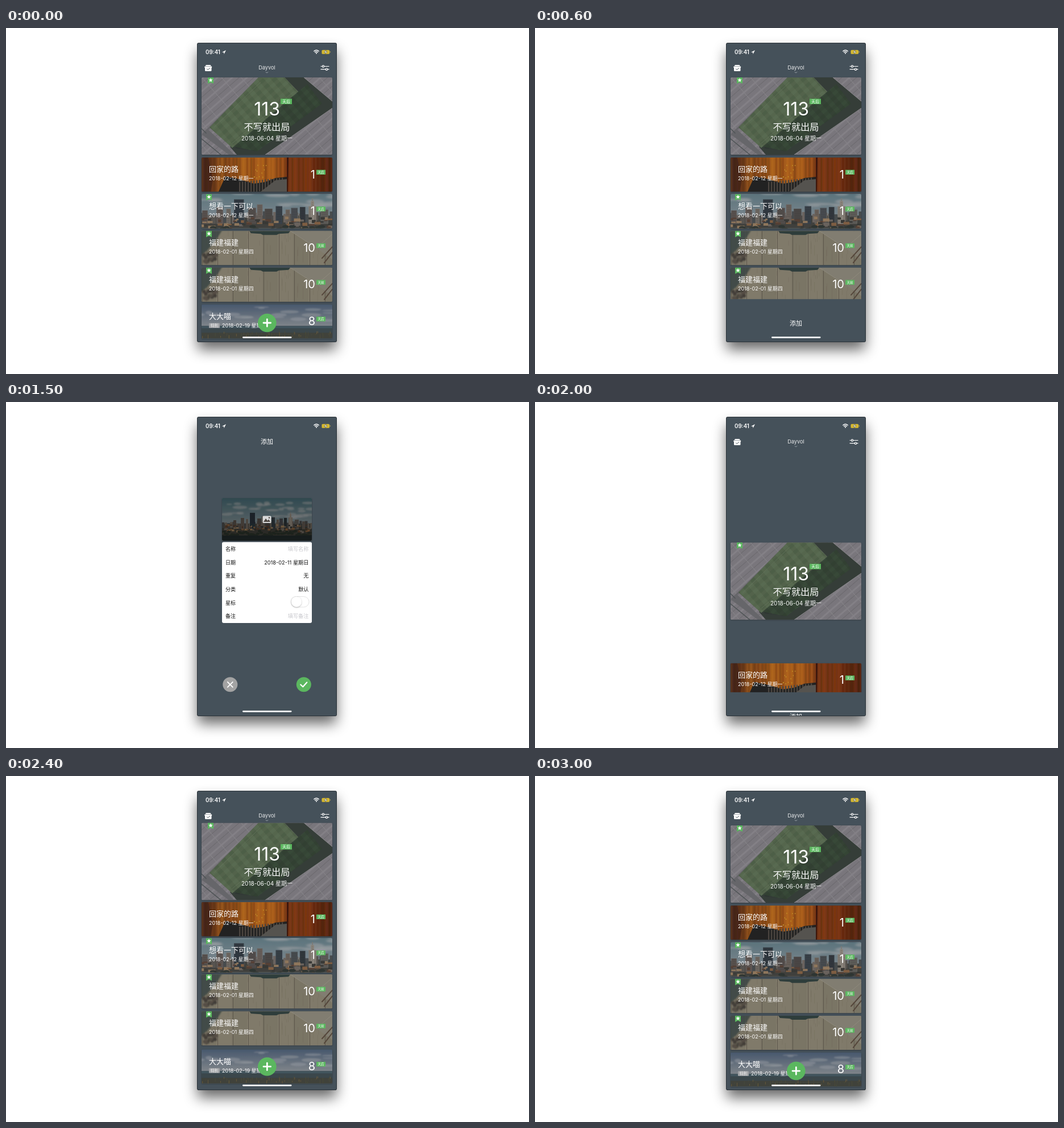
Write an HTML page that moves like this. It is 920 px wide and 609 px high and loops after 3100 ms.

```html
<!DOCTYPE html>
<html lang="zh">
<head>
<meta charset="utf-8">
<style>
  html, body { margin: 0; width: 100%; height: 100%; overflow: hidden; background: #fff; }
  svg { display: block; }
  text { font-family: Inter, "Noto Sans CJK SC", "Noto Sans CJK", sans-serif; fill: #fff; }
</style>
</head>
<body>
<svg id="stage" width="920" height="609" viewBox="0 0 920 609"></svg>
<script>
const BG = '#45515a', GREEN = '#5bb75f', HEIGHT = 525, LOOP = 3100;
const OPEN_AT = 571, CLOSE_AT = 1816;

let seed = 7;
const rnd = () => (seed = seed * 16807 % 2147483647) / 2147483647;
const many = (n, fn) => Array.from({ length: n }, (_, i) => fn(i)).join('');

const rect = (x, y, w, h, fill, extra = '') =>
  `<rect x="${x}" y="${y}" width="${w}" height="${h}" fill="${fill}" ${extra}/>`;
const poly = (points, fill, extra = '') => `<polygon points="${points}" fill="${fill}" ${extra}/>`;
const line = (d, stroke, width = 1) =>
  `<path d="${d}" fill="none" stroke="${stroke}" stroke-width="${width}" stroke-linecap="round" stroke-linejoin="round"/>`;
const disc = (x, y, r, fill) => `<circle cx="${x}" cy="${y}" r="${r}" fill="${fill}"/>`;
const oval = (x, y, rx, ry, fill, opacity) =>
  `<ellipse cx="${x}" cy="${y}" rx="${rx}" ry="${ry}" fill="${fill}" opacity="${opacity}"/>`;
const label = (x, y, size, str, extra = '') =>
  `<text x="${x}" y="${y}" font-size="${size}" ${extra}>${str}</text>`;
const soft = body => `<g filter="url(#soft)">${body}</g>`;
const END = 'text-anchor="end"', MID = 'text-anchor="middle"';

const defs = `<defs>
  <filter id="blur" x="-30%" y="-30%" width="160%" height="160%"><feGaussianBlur stdDeviation="12.5"/></filter>
  <filter id="soft"><feGaussianBlur stdDeviation="1.1"/></filter>
  <filter id="lift" x="-5%" y="-10%" width="110%" height="125%"><feDropShadow dx="0" dy=".8" stdDeviation="1" flood-opacity=".35"/></filter>
  <clipPath id="screen"><rect x="337" y="27" width="244" height="525" rx="2"/></clipPath>
  <clipPath id="row"><rect width="230" height="60" rx="2"/></clipPath>
  <clipPath id="hero"><rect width="230" height="136" rx="2"/></clipPath>
  <clipPath id="cover"><rect width="158" height="75" rx="2"/></clipPath>
  <pattern id="seats" width="26" height="17" patternUnits="userSpaceOnUse" patternTransform="rotate(-41)">
    ${rect(0, 0, 26, 17, '#79767b')}${rect(0, 0, 26, 3, '#838086')}${rect(0, 9, 26, 1, '#6b696e')}${rect(0, 3, .8, 14, '#88868b')}
  </pattern>
  <pattern id="mown" width="18" height="12" patternUnits="userSpaceOnUse" patternTransform="rotate(-41)">
    ${rect(0, 0, 9, 12, '#000', 'opacity=".08"')}${rect(0, 0, 18, 6, '#000', 'opacity=".05"')}
  </pattern>
  <linearGradient id="day" x2="0" y2="1"><stop stop-color="#568590"/><stop offset=".6" stop-color="#9fb0b8"/></linearGradient>
  <linearGradient id="dusk" x2="0" y2="1"><stop stop-color="#48586d"/><stop offset=".62" stop-color="#7d8389"/></linearGradient>
  <linearGradient id="cloth"><stop stop-color="#522a1c"/><stop offset=".13" stop-color="#7b431a"/>
    <stop offset=".33" stop-color="#a8601c"/><stop offset=".62" stop-color="#a0541b"/>
    <stop offset=".66" stop-color="#7d3a16"/><stop offset=".85" stop-color="#713113"/><stop offset="1" stop-color="#43200f"/></linearGradient>
</defs>`;

const stadium = rect(0, 0, 230, 136, 'url(#seats)')
  + poly('0,100 100,0 110,0 12,92 58,136 48,136', '#66666a')
  + poly('146,0 180,0 230,42 230,54 112,136 62,136 50,122 170,25', '#343c38')
  + poly('170,25 186,12 212,46 98,130 56,122', '#384839')
  + poly('14,88 100,0 146,0 170,25 54,124', '#596b51')
  + poly('14,88 100,0 146,0 170,25 186,12 212,46 98,130 54,124', 'url(#mown)')
  + line('M22 88L104 8M54 116L162 25', '#6a7a62', .6)
  + line('M180 0L230 42M112 136L230 54', '#88868a', 1)
  + line('M0 90L8 98M0 108L34 136', '#505457', 1.6);

const shrine = rect(0, 0, 230, 60, 'url(#cloth)')
  + soft(many(36, i => rect(i * 6.5 + rnd() * 3, 0, 1.5 + rnd() * 2, 60, rnd() > .45 ? '#3d1509' : i < 23 ? '#d6842a' : '#963f16', 'opacity=".35"')))
  + many(12, () => rect(92 + rnd() * 24, 6 + rnd() * 30, 1, 2, '#c9a02c'))
  + poly('30,60 42,33 66,38 92,46 112,43 130,36 150,34 150,60', '#242220')
  + many(16, i => rect(66 + i * 5, 43 - i * .5, 2.2, 20, '#4b4540'))
  + poly('104,60 130,40 150,38 150,60', '#55534f')
  + poly('150,0 153,0 152,60 150,60', '#3d190e')
  + poly('0,0 12,0 20,40 16,60 0,60', '#351e1b', 'opacity=".5"');

const towers = [
  [20, 5, 39, '#746961'], [33, 6, 35, '#7f7168'], [42, 4, 37, '#92877b'], [49, 9, 26, '#39434c'],
  [62, 7, 36, '#6b625d'], [70, 5, 32, '#8a7d72'], [77, 7, 37, '#615a54'], [87, 6, 34, '#434d55'],
  [96, 4, 38, '#8d7e71'], [101, 6, 36, '#5b5f62'], [109, 5, 35, '#3a4147'],
  [117, 7, 34, '#b0a495'], [119, 3, 28, '#bbb0a1'], [128, 7, 38, '#7c7870'], [141, 5, 41, '#7d7369']
];
const city = rect(0, 0, 158, 75, 'url(#day)')
  + soft(many(34, () => oval(rnd() * 158, 8 + rnd() * 27, 4 + rnd() * 9, 1 + rnd() * 2, '#d2d7d9', .6)))
  + rect(0, 45, 158, 30, '#4d4d43')
  + many(34, i => rect(i * 4.7, 40 + rnd() * 5, 2 + rnd() * 3, 10, ['#6f675f', '#595c5d', '#8c8175'][rnd() * 3 | 0]))
  + towers.map(([x, w, top, fill]) => rect(x, top, w, 55 - top, fill)
      + many(9, i => rect(x + .8, top + 1.5 + i * 2, w - 1.6, .6, '#000', 'opacity=".22"'))).join('')
  + line('M120.500 28V25', '#aaa195', .8)
  + many(90, () => rect(rnd() * 156, 46 + rnd() * 13, 2 + rnd() * 4, 1.5 + rnd() * 2.5,
      ['#a9774c', '#6d4c39', '#c09c71', '#40403a', '#8b7f74'][rnd() * 5 | 0]))
  + many(54, i => oval(i * 3, 58 + rnd() * 9, 3, 2, '#353b34', 1))
  + rect(0, 66, 158, 9, '#2b322f');
const cityRow = `<g transform="translate(115 -30) scale(1.93 1.5) translate(-79 0)">${city}</g>`
  + rect(0, 0, 230, 60, '#23282e', 'opacity=".32"');

const desk = rect(0, 0, 230, 60, '#7a7566')
  + many(9, i => rect(i * 27 - 1, 0, 27, 60, i % 2 ? '#807a6a' : '#7a7465') + rect(i * 27 + 1, 0, .8, 60, '#565146'))
  + many(40, () => rect(rnd() * 230, rnd() * 50, .5, 5 + rnd() * 18, '#625c4f', 'opacity=".4"'))
  + soft(poly('-4,-4 38,-4 24,18 10,34 -4,46', '#3b4643', 'opacity=".85"'))
  + poly('84,0 156,0 153,4 136,5 132,7 108,7 104,5 87,4', '#2f3c3b')
  + poly('156,0 230,0 230,50 202,30', '#817d71') + line('M156 0L202 30L230 6', '#949082', .7)
  + line('M230 28L212 48M230 38L216 56', '#54463b', 2)
  + soft(many(18, () => disc(rnd() * 24 + 2, 38 + rnd() * 18, 3.2, rnd() > .5 ? '#423e38' : '#544e45')));

const coast = rect(0, 0, 230, 60, 'url(#dusk)')
  + soft(many(18, () => oval(rnd() * 230, 4 + rnd() * 27, 5 + rnd() * 13, 1 + rnd() * 2.5, '#9a9da3', .45)))
  + rect(0, 38, 230, 22, '#3a464c') + rect(0, 38, 230, 4, '#42545d') + rect(0, 50, 230, 10, '#40423a')
  + many(60, () => rect(rnd() * 230, 46 + rnd() * 10, .9, 2 + rnd() * 6, rnd() > .6 ? '#6a5a3c' : '#4a4b3b'));

const ribbon = x => poly(`${x},0 ${x + 10},0 ${x + 10},11 ${x + 5},8.7 ${x},11`, GREEN)
  + poly(many(10, i => {
      const a = i * Math.PI / 5 - Math.PI / 2, r = i % 2 ? 1.7 : 3.9;
      return `${x + 5 + r * Math.cos(a)},${4.8 + r * Math.sin(a)} `;
    }), '#fff');

const group = (id, body) => `<g id="${id}">${body}</g>`;
const art = (clip, body) => `<g filter="url(#lift)"><g clip-path="url(#${clip})">${body}</g></g>`;

const heroCard = art('hero', stadium) + ribbon(11)
  + label(138, 67, 32, '113', END)
  + rect(139, 37.5, 20, 9.5, GREEN) + label(149, 45, 7, '天后', MID)
  + label(115, 93, 16.2, '不写就出局', MID) + label(115, 110.5, 10, '2018-06-04 星期一', MID);

const rowCard = ({ image, title, date, days, unit, star, tag }) => art('row', image)
  + (star ? ribbon(8) : '')
  + label(13, 25.2, 13, title)
  + (tag ? rect(13, 33, 19, 8.5, '#a0a2a5', 'rx="1"') + label(22.5, 39.6, 6.5, tag, MID) : '')
  + label(tag ? 36 : 13, 40.2, 9, date)
  + label(200, 36.6, 20, days, END)
  + rect(202, 21.7, 16, 8.3, GREEN) + label(210, 28, 5.5, unit, MID);

const fujian = { image: desk, title: '福建福建', date: '2018-02-01 星期四', days: 10, unit: '天前', star: true };
const rows = [
  { image: shrine, title: '回家的路', date: '2018-02-12 星期一', days: 1, unit: '天后' },
  { image: cityRow, title: '想看一下可以', date: '2018-02-12 星期一', days: 1, unit: '天后', star: true },
  fujian, fujian,
  { image: coast, title: '大大喵', date: '2018-02-19 星期一', days: 8, unit: '天后', tag: '特别' }
];
const cards = [heroCard, ...rows.map(rowCard)];
const cardTop = i => i ? 228 + (i - 1) * 64.6 : 87;

const header = `<path d="M351 67V66.5Q351 65 352.5 65H359Q360.5 65 360.5 66.5V67Z" fill="#fff"/>`
  + rect(349.2, 67.6, 13, 2.4, '#fff', 'rx="1"') + rect(350, 69, 11.5, 7, '#fff', 'rx="1.5"')
  + line('M353.5 72L355.3 73.7L358.5 70.5', BG)
  + label(459, 73.2, 9.2, 'Dayvol', `${MID} fill-opacity=".88"`)
  + line('M457 77.5L459 79L461 77.5', '#a7b0b5', .8)
  + line('M554 67.5H568M554 72.7H568', '#fff', 1.2)
  + [[558, 67.5], [564, 72.7]].map(([x, y]) => `<circle cx="${x}" cy="${y}" r="1.7" fill="${BG}" stroke="#fff" stroke-width="1.2"/>`).join('');

const status = label(351, 45.5, 9.7, '09:41', 'font-weight="600"')
  + poly('380,42.7 387,39 383.5,46 383.2,43', '#fff')
  + line('M541.8 40.8Q546 37 550.2 40.8M543.6 42.8Q546 40.6 548.4 42.8', '#fff', 1.4)
  + disc(546, 44.6, 1.1, '#fff')
  + rect(555.5, 38.7, 13.5, 7, '#d7b92f', 'rx="1.5"') + rect(569.6, 40.8, 1.2, 2.8, '#b5a04a')
  + poly('563,38.8 559.5,42.7 562,42.7 561.3,45.8 565,41.7 562.6,41.7', '#fff', `stroke="${BG}" stroke-width=".6"`);

const fields = [
  ['名称', '填写名称', true], ['日期', '2018-02-11 星期日'], ['重复', '无'],
  ['分类', '默认'], ['星标', ''], ['备注', '填写备注', true]
];
const ink = muted => `style="fill:${muted ? '#c7c7cc' : '#111'}"`;
const panel = rect(337, 27, 244, HEIGHT, BG)
  + label(459, 74, 11, '添加', MID)
  + `<g transform="translate(380 169)">${art('cover', city + rect(0, 0, 158, 75, '#000', 'opacity=".45"'))}</g>`
  + rect(451.5, 200.5, 15, 12.5, '#d8d8d8', 'rx="1.5"')
  + poly('453,211 457,205 460,209 462,206.5 465,211', '#4b4540') + disc(463, 203.7, 1.2, '#4b4540')
  + rect(380, 246.5, 158, 142.5, '#fff', 'rx="3"')
  + fields.map(([name, value, muted], i) => {
      const y = 261.9 + i * 23.7;
      return label(386, y, 9, name, ink()) + label(532.5, y, 9.2, value, END + ' ' + ink(muted));
    }).join('')
  + rect(501, 342.5, 32, 18.5, '#fff', 'rx="9.25" stroke="#e2e2e2"')
  + `<g filter="url(#lift)">${disc(511, 351.7, 9, '#fff')}</g>`
  + disc(394.3, 497.3, 13, '#a3a3a3') + line('M389.8 492.8L398.8 501.8M398.8 492.8L389.8 501.8', '#fff', 1.8)
  + disc(523.8, 497.3, 13, GREEN) + line('M518.3 497.5L522.3 501.3L529.3 493.5', '#fff', 2.2);

const fab = disc(459.3, 519, 16.3, GREEN) + line('M453 519H465.6M459.3 512.7V525.3', '#fff', 2.8);

const stage = document.getElementById('stage');
stage.innerHTML = defs
  + rect(337, 41, 244, HEIGHT, '#000', 'filter="url(#blur)" opacity=".6"')
  + rect(336, 26, 246, 527, '#2a3238', 'rx="3"')
  + `<g clip-path="url(#screen)">${rect(337, 27, 244, HEIGHT, BG)}${header}`
  + cards.map((body, i) => group('card' + i, body)).join('')
  + group('fab', fab) + group('panel', panel) + status
  + rect(416, 543.2, 86.5, 2.8, '#fff', 'rx="1.4"') + '</g>';

// Remaining distance (1 to 0) of a critically damped and of a bouncy spring.
const glide = ms => {
  const u = Math.max(0, ms) * .0228;
  return (1 + u) * Math.exp(-u);
};
const bounce = ms => {
  const u = Math.max(0, ms) * .0112;
  return Math.exp(-.8 * u) * (Math.cos(.6 * u) + Math.sin(.6 * u) * 4 / 3);
};
const move = (id, x, y) => document.getElementById(id).setAttribute('transform', `translate(${x} ${y})`);

function draw(t) {
  const rise = delay => t < CLOSE_AT ? 0 : HEIGHT * bounce(t - CLOSE_AT - delay);
  cards.forEach((_, i) => move('card' + i, 344, cardTop(i) + rise(i * 36)));
  move('fab', 0, rise(86));
  move('panel', 0, HEIGHT * (glide(t - OPEN_AT) + 1 - glide(t - CLOSE_AT)));
}

// The picture advances ten times a second.
function tick() {
  draw(Math.floor(performance.now() % LOOP / 100) * 100);
  requestAnimationFrame(tick);
}
tick();
</script>
</body>
</html>
```
